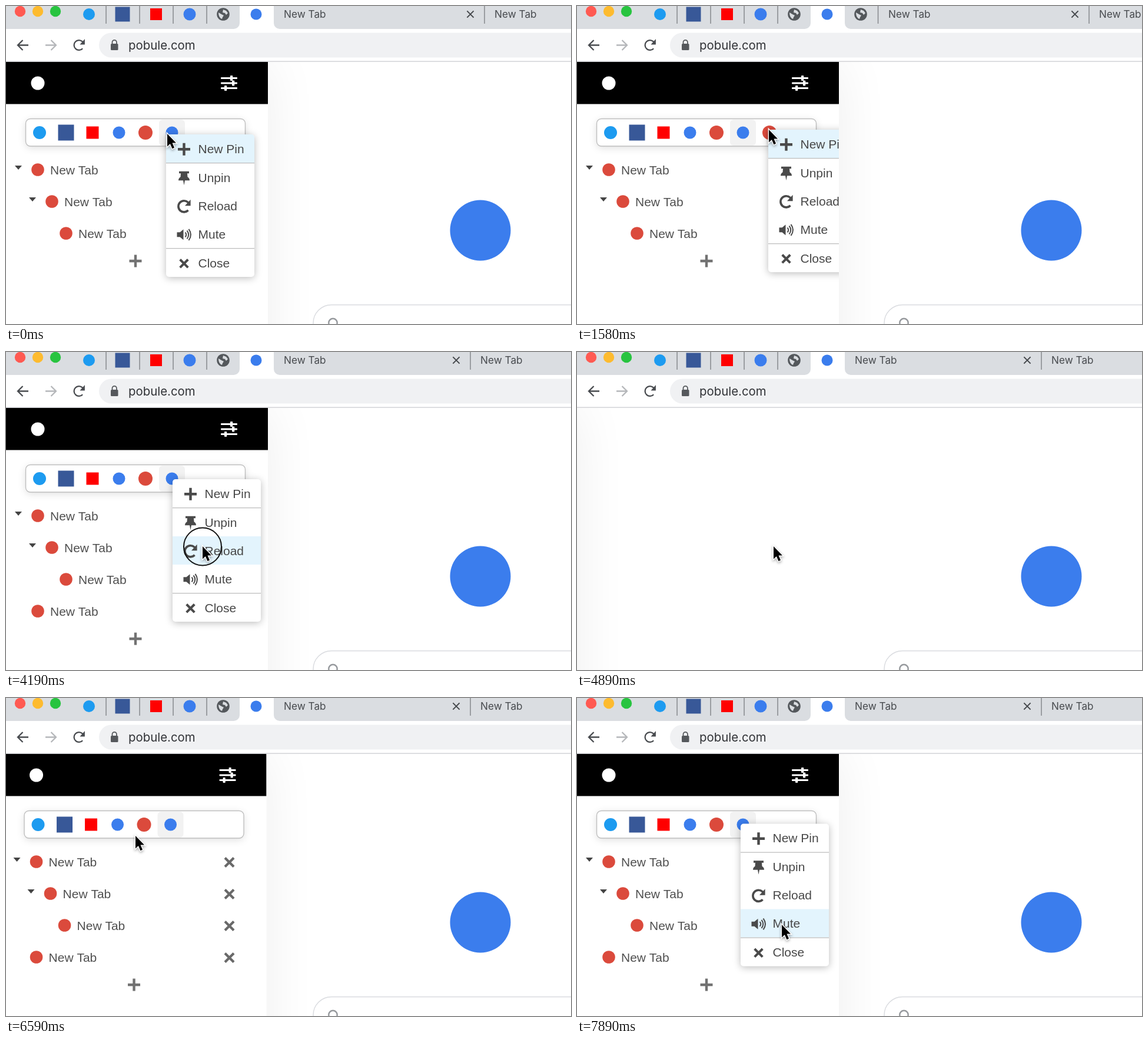
An HTML page with a canvas that plays this animation: 960 by 540 pixels, repeating every 7.99 s.

```html
<!DOCTYPE html>
<html lang="en">
<head>
<meta charset="utf-8">
<title>Tab tree sidebar</title>
<style>
  html, body { margin: 0; width: 100%; height: 100%; overflow: hidden; background: #fff; }
  canvas { display: block; }
</style>
</head>
<body>
<canvas id="stage" width="960" height="540"></canvas>
<script>
const ctx = document.getElementById('stage').getContext('2d');
const LOOP = 7990;
const UI_FONT = 'Inter, Roboto, sans-serif';
const PANEL_FONT = '"Liberation Sans", Arial, sans-serif';
const BLUE = '#3b7ded', RED = '#db4a3c', INK = '#4a4a4a';

// Times of the events in ms
const PIN_ADDED = 580, PIN_REMOVED = 2480, RELOADED = 4380, SLIDE_IN = 6230;
const CLICKS = [[450, 580], [2330, 2480], [4080, 4280]];
const MENUS = [ // open, close, x, y
  [0, 580, 272, 218], [1480, 2480, 325, 210], [3380, 4280, 283, 216], [7270, LOOP, 278, 213.5]
];
const POINTER = [ // time, x, y
  [0, 274, 217], [380, 318, 238], [700, 318, 238], [1350, 326, 210], [1600, 326, 210],
  [2150, 352, 282], [2540, 352, 282], [2880, 307, 244], [3220, 284, 216], [3550, 284, 216],
  [4040, 334, 330], [4900, 334, 330], [5950, 1, 252], [6250, 1, 252], [6580, 220, 234],
  [6950, 279, 213], [7350, 279, 213], [7850, 348, 385], [LOOP, 348, 385]
];

const clamp = v => Math.max(0, Math.min(1, v));
const smooth = v => v * v * (3 - 2 * v);
const ramp = (t, start, length) => smooth(clamp((t - start) / length));
const mix = (a, b, k) => a + (b - a) * k;

function pointerAt(t) {
  const i = Math.max(1, POINTER.findIndex(p => p[0] >= t));
  const a = POINTER[i - 1], b = POINTER[i];
  const k = smooth(clamp((t - a[0]) / (b[0] - a[0])));
  return { x: mix(a[1], b[1], k), y: mix(a[2], b[2], k) };
}

function box(x, y, w, h, color, radius = 0) {
  ctx.beginPath();
  ctx.roundRect(x, y, w, h, radius);
  ctx.fillStyle = color;
  ctx.fill();
}

function disc(x, y, r, color) {
  ctx.beginPath();
  ctx.arc(x, y, r, 0, 7);
  ctx.fillStyle = color;
  ctx.fill();
}

function square(x, y, size, color) {
  box(x - size / 2, y - size / 2, size, size, color);
}

function shape(path, color, x = 0, y = 0) {
  ctx.save();
  ctx.translate(x, y);
  ctx.fillStyle = color;
  ctx.fill(new Path2D(path));
  ctx.restore();
}

function line(path, color, width, x = 0, y = 0) {
  ctx.save();
  ctx.translate(x, y);
  ctx.strokeStyle = color;
  ctx.lineWidth = width;
  ctx.stroke(new Path2D(path));
  ctx.restore();
}

function text(str, x, baseline, size, color, font) {
  ctx.font = `${size}px ${font}`;
  ctx.fillStyle = color;
  ctx.fillText(str, x, baseline);
}

function withShadow(color, blur, dy, draw) {
  ctx.save();
  ctx.shadowColor = color;
  ctx.shadowBlur = blur;
  ctx.shadowOffsetY = dy;
  draw();
  ctx.restore();
}

const plus = (x, y, color) => line('M-10.5 0H10.5M0-10.5V10.5', color, 4.4, x, y);
const cross = (x, y, color, r = 7.5, width = 4.2) =>
  line(`M${-r} ${-r}L${r} ${r}M${r} ${-r}L${-r} ${r}`, color, width, x, y);

function reloadArrow(x, y, r, color, width) {
  ctx.beginPath();
  ctx.arc(x, y, r, 0.75, 5.6);
  ctx.strokeStyle = color;
  ctx.lineWidth = width;
  ctx.stroke();
  shape(`M${r + 1.5} ${-r - 2}V-1H${1.5}Z`, color, x, y);
}

function globe(x, y) {
  disc(x, y, 10.8, '#54585c');
  shape('M-8-3L-3 0L1 2L-1 5L-2 8Q-8 6-8-3ZM0-8L5-6L8-2L5 1L3-2L-1-3Z', '#dadde1', x, y);
}

const menuIcons = [
  (x, y) => plus(x, y, INK),
  (x, y) => shape('M-8.5-11.5H8.5V-8H5.5L6-2Q9.5 0 9.5 4H1.5L0 12L-1.5 4H-9.5Q-9.5 0-6-2L-5.5-8H-8.5Z', INK, x, y),
  (x, y) => reloadArrow(x, y, 9.6, INK, 3.6),
  (x, y) => {
    shape('M-12-4H-7L-1-9V9L-7 4H-12Z', INK, x, y);
    line('M2-4Q5.5 0 2 4M5-7Q10.5 0 5 7M8-9.5Q15 0 8 9.5', INK, 2, x, y);
  },
  (x, y) => cross(x, y, INK, 6.8, 4)
];
const MENU_LABELS = ['New Pin', 'Unpin', 'Reload', 'Mute', 'Close'];
const MENU_TOPS = [0, 49, 97, 145, 194];

function drawMenu(x, y, pointer) {
  withShadow('rgba(0,0,0,.27)', 13, 2, () => box(x, y, 150, 242, '#fff', 5));
  const hovered = MENU_TOPS.findLastIndex(top => top <= Math.max(0, pointer.y - y));
  box(x, y + MENU_TOPS[hovered], 150, 48, '#e3f4fd', hovered ? 0 : [5, 5, 0, 0]);
  box(x, y + 48, 150, 1.3, '#bdbdbd');
  box(x, y + 193, 150, 1.3, '#bdbdbd');
  MENU_LABELS.forEach((label, i) => {
    const middle = y + MENU_TOPS[i] + 24.5;
    menuIcons[i](x + 30.5, middle + 0.8);
    text(label, x + 54.5, middle + 7.2, 21, '#484848', PANEL_FONT);
  });
}

function drawPage(t) {
  box(0, 95, 960, 445, '#fff');
  disc(806, 381, 51.5, BLUE);
  ctx.beginPath();
  ctx.roundRect(522, 507.5, 800, 62, 31);
  ctx.strokeStyle = '#d9dbdf';
  ctx.lineWidth = 1.4;
  ctx.stroke();
  ctx.beginPath();
  ctx.arc(555.5, 538, 7.2, 0, 7);
  ctx.strokeStyle = '#96999d';
  ctx.lineWidth = 2.4;
  ctx.stroke();
  const caretOn = t >= 4900 && t < 6400 && (t - 4900) % 1000 < 500;
  if (caretOn) box(593, 527, 1.7, 20, '#333');
}

function drawRow(index, depth, open, showClose, hovered) {
  const y = 279 + 54 * index, x = 24 * depth;
  if (hovered) box(33, y - 20.5, 374, 41, '#f2f2f2', 6);
  if (open) shape('M-6-3.5H6L0 3.5Z', '#444', 21 + x, y - 4.5);
  disc(54 + x, y - 1, 10.8, RED);
  text('New Tab', 75 + x, y + 7.3, 21, '#505050', PANEL_FONT);
  if (showClose) cross(382, y, '#696969');
}

function drawPanel(t, pointer) {
  const loaded = t < RELOADED;
  const offset = loaded ? 0 : -445 * Math.pow(1 - clamp((t - SLIDE_IN) / 400), 2.5);
  const menu = MENUS.find(m => t >= m[0] && t < m[1]);
  const extraPin = t >= PIN_ADDED && t < PIN_REMOVED;
  const rows = t >= PIN_REMOVED ? 4 : 3;

  ctx.save();
  ctx.translate(offset, 0);
  withShadow('rgba(0,0,0,.07)', 85, 0, () => box(0, 95, 445, 600, '#fff'));
  ctx.beginPath();
  ctx.rect(0, 95, 445, 445);
  ctx.clip();

  box(0, 95, 445, 71.5, '#000');
  disc(54, 131, 11.5, '#fff');
  for (const [y, knob] of [[122.5, 383], [131, 386], [139.5, 373]]) {
    box(365, y - 1.6, 28, 3.2, '#fff', 1);
    box(knob - 2, y - 4.5, 4.2, 9, '#fff', 1);
  }

  withShadow('rgba(0,0,0,.13)', 14, 3, () => box(33.5, 191.5, 373, 46.5, '#fff', 8));
  ctx.strokeStyle = '#bfbfbf';
  ctx.lineWidth = 1.4;
  ctx.stroke();
  box(260, 193, 44, 44, '#f2f2f2', 6);
  disc(57, 215, 11, '#1d9bf0');
  square(102, 215, 27, '#385898');
  square(147, 215, 21, '#ff0000');
  disc(192, 215, 10.5, BLUE);
  disc(237, 215, 12, RED);
  disc(282, 215, 10.5, BLUE);
  if (extraPin) disc(327, 215, 12, RED);

  const showClose = !menu;
  const hovered = menu || pointer.y < 241 ? -1 : Math.floor((pointer.y - 241) / 58);
  [0, 1, 2, 0].slice(0, rows).forEach((depth, i) =>
    drawRow(i, depth, i < 2, showClose, i === hovered));
  plus(220, 271 + 54 * rows, '#727272');

  if (menu) drawMenu(menu[2], menu[3], pointer);
  ctx.restore();
}

function drawTabs(t) {
  box(0, 0, 960, 95, '#fff');
  box(0, 0, 397, 39, '#dadde1', [0, 0, 10, 0]);
  box(455, 0, 505, 39, '#dadde1', [0, 0, 0, 10]);
  disc(24, 9, 9.2, '#ff5a52');
  disc(54, 9, 9.2, '#fdbb2f');
  disc(84, 9, 9.2, '#28c440');

  const divider = x => box(x - 0.7, 0, 1.5, 30, '#85888c');
  [170, 227, 284, 341].forEach(divider);
  disc(141, 14, 10, '#1d9bf0');
  square(198, 14, 25, '#385898');
  square(255, 14, 20, '#ff0000');
  disc(312, 14, 10.5, BLUE);
  globe(369, 14);
  disc(425, 14, 9.5, BLUE);

  const added = ramp(t, PIN_ADDED, 200), removed = ramp(t, PIN_REMOVED, 200);
  const shown = added - removed;
  const closeX = 789 + 57 * added - 81 * removed;
  if (shown > 0) {
    ctx.globalAlpha = shown;
    globe(482, 14);
    divider(455 + 56.5 * shown);
    ctx.globalAlpha = 1;
  }
  text('New Tab', 472 + 57 * shown, 20, 17.2, '#484b4f', UI_FONT);
  cross(closeX, 14, '#44474b', 5.6, 2);
  divider(closeX + 24);
  text('New Tab', closeX + 41, 20, 17.2, '#484b4f', UI_FONT);
}

function drawToolbar() {
  const arrow = 'M9.5 0H-8M0-8.5L-8.5 0L0 8.5';
  line(arrow, '#484b4f', 2.3, 28.5, 66.5);
  line('M-9.5 0H8M0-8.5L8.5 0L0 8.5', '#b5b7ba', 2.3, 76.5, 66.5);
  reloadArrow(124, 66.5, 8.4, '#484b4f', 2.3);
  box(158, 45.5, 840, 42, '#f0f1f3', 21);
  box(178, 64, 12.5, 11, '#55585c', 1.5);
  line('M-3.7 0V-2.5A3.7 3.7 0 0 1 3.7-2.5V0', '#55585c', 1.8, 184.2, 64);
  text('pobule.com', 208, 74, 20.4, '#303236', UI_FONT);
  box(0, 93.2, 960, 1.8, '#d8d9dc');
}

function drawPointer(t, { x, y }) {
  if (CLICKS.some(([from, to]) => t >= from && t < to)) {
    ctx.beginPath();
    ctx.arc(x, y + 0.5, 32, 0, 7);
    ctx.strokeStyle = '#111';
    ctx.lineWidth = 2;
    ctx.stroke();
  }
  const arrow = 'M0 0V21.5L4.9 17L8.5 25.2L12 23.6L8.5 15.6H15Z';
  withShadow('rgba(0,0,0,.35)', 4, 2, () => line(arrow, '#fff', 2.8, x, y));
  shape(arrow, '#000', x, y);
}

function render(now) {
  const t = Math.max(0, Math.floor((now % LOOP + 20) / 100) * 100 - 20);
  const pointer = pointerAt(t);
  drawPage(t);
  drawPanel(t, pointer);
  drawTabs(t);
  drawToolbar();
  drawPointer(t, pointer);
}

const start = performance.now();
function tick() {
  render(performance.now() - start);
  requestAnimationFrame(tick);
}
tick();
</script>
</body>
</html>
```
